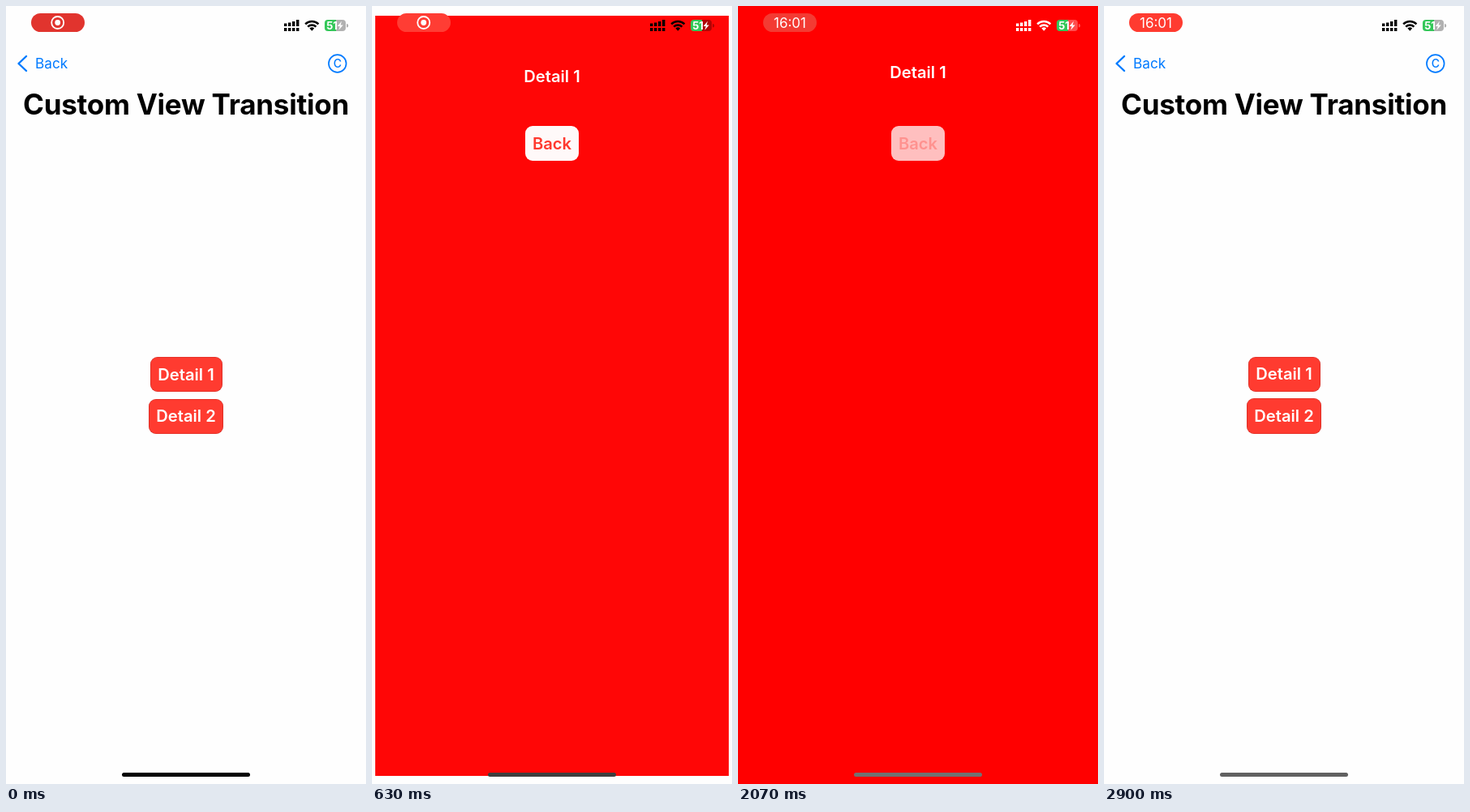
An HTML page for the animation above (2.93 s loop, 444 by 960 pixels).

```html
<!DOCTYPE html>
<html lang="en">
<head>
<meta charset="utf-8">
<title>Custom View Transition</title>
<style>
  html, body { margin: 0; width: 100%; height: 100%; overflow: hidden; background: #fefefe; }
  #stage {
    position: absolute; left: 0; top: 0; width: 444px; height: 960px; overflow: hidden;
    background: #fefefe; font: 600 20.2px/1 Inter, "Open Sans", sans-serif;
  }
  #stage div { position: absolute; }
  svg { position: absolute; left: 0; top: 0; overflow: visible; }
  .label { transform: translate(-50%, -50%); white-space: nowrap; color: #fff; left: 222px; }
  .tile { background: #ff3b30; border-radius: 9px; overflow: hidden; }
  .tile { box-shadow: inset 0 0 0 .6px rgba(110, 0, 0, .35); }
  .edge { box-shadow: inset 0 0 0 .8px rgba(110, 0, 0, .6); }
  #first { left: 177.5px; width: 89.5px; height: 43px; }
  #firstLabel { left: 44.5px; }
  #detail { background: #f00; }
  #pill { left: 189px; top: 148px; width: 66px; height: 43px; border-radius: 9px; background: #fff; }
  #back { left: 33px; top: 21.5px; color: #ff3b30; }
  #nav { left: 0; top: 0; width: 444px; height: 150px; }
  #heading { top: 120.5px; color: #000; font-size: 35px; font-weight: 700; letter-spacing: -.007em; }
  #navBack { left: 36px; top: 62.4px; color: #007aff; font-size: 17.2px; font-weight: 400; }
  #mark { left: 408.8px; top: 71px; color: #007aff; font-size: 14px; font-weight: 500; }
  #capsule { left: 31px; top: 9px; width: 66px; height: 23px; border-radius: 11.5px; }
  #clock { left: 33px; top: 11.7px; font-size: 17px; font-weight: 400; }
  #charge { left: 402px; top: 24.3px; font-size: 13px; font-weight: 700; }
  #bar { left: 143px; top: 946px; width: 158px; height: 5px; border-radius: 2.5px; }
</style>
</head>
<body>
<div id="stage">
  <div id="first" class="tile"><div id="firstLabel" class="label">Detail 1</div></div>
  <div id="second" class="tile"></div>

  <div id="detail"></div>
  <div id="secondLabel" class="label">Detail 2</div>
  <div id="title" class="label">Detail 1</div>
  <div id="pill"><div id="back" class="label">Back</div></div>

  <div id="nav">
    <svg width="444" height="150" fill="none" stroke="#007aff">
      <path d="M25 62 L15.5 71 L25 80" stroke-width="2.4" stroke-linecap="round" stroke-linejoin="round"/>
      <circle cx="408.8" cy="71" r="10.8" stroke-width="1.7"/>
    </svg>
    <div id="navBack">Back</div>
    <div id="mark" class="label">C</div>
    <div id="heading" class="label">Custom View Transition</div>
  </div>

  <div id="capsule">
    <svg id="record" width="66" height="23">
      <circle cx="32.7" cy="11.5" r="7.5" fill="none" stroke="#fff" stroke-width="1.8"/>
      <circle cx="32.7" cy="11.5" r="3.4" fill="#fff"/>
    </svg>
    <div id="clock" class="label">16:01</div>
  </div>

  <svg id="status" width="444" height="40">
    <g fill="currentColor">
      <path d="M343 27h3.4v4H343z M348 27h3.4v4H348z M353 27h3.4v4H353z M358 27h3.4v4H358z"/>
      <path d="M343 21.5h3.4V25H343z M348 20.5h3.4V25H348z M353 19h3.4v6H353z M358 17h3.4v8H358z"/>
      <path d="M377.3 30.8 L374.4 27.6 A4.2 4.2 0 0 1 380.2 27.6 Z"/>
    </g>
    <g fill="none" stroke="currentColor" stroke-width="2.5">
      <path d="M369.2 22.4 A11.5 11.5 0 0 1 385.4 22.4 M372.2 25.7 A7.2 7.2 0 0 1 382.4 25.7"/>
    </g>
    <g fill="currentColor" opacity=".3">
      <path d="M407 17h8a4 4 0 0 1 4 4v6a4 4 0 0 1-4 4h-8z M420 22a2.3 2.3 0 0 1 0 4.6z"/>
    </g>
    <path d="M407 17h-10a4 4 0 0 0-4 4v6a4 4 0 0 0 4 4h10z" fill="#34c759"/>
    <path d="M414 18.8l-5.3 6.2h3.1l-1.4 4.8 5.4-6.4h-3.2z" fill="#fff"/>
  </svg>
  <div id="charge" class="label">51</div>
  <div id="bar"></div>
</div>

<script>
  const LOOP = 2930, OPEN = 139, CLOSE = 2160.5;
  const el = {};
  document.querySelectorAll('#stage [id]').forEach(e => el[e.id] = e);

  const mix = (a, b, k) => a + (b - a) * k;
  const ramp = (t, a, b) => Math.min(1, Math.max(0, (t - a) / (b - a)));
  const smooth = k => k * k * (3 - 2 * k);
  // Critically damped spring from 0 to 1
  const spring = (ms, w) => {
    const x = Math.max(0, ms) / 1000 * w;
    return 1 - (1 + x) * Math.exp(-x);
  };
  // Linear track through [time, value...] points
  const track = (t, pts) => {
    let i = 0;
    while (i < pts.length - 2 && t >= pts[i + 1][0]) i++;
    const [a, b] = [pts[i], pts[i + 1]], k = ramp(t, a[0], b[0]);
    return a.slice(1).map((v, n) => Math.round(mix(v, b[n + 1], k)));
  };
  const rgb = c => `rgb(${c.join()})`;
  const press = (t, down, up, out) => ramp(t, down, down + 70) * (1 - ramp(t, up, out));

  const place = (e, cx, cy, w, h) => {
    e.style.left = cx - w / 2 + 'px';
    e.style.top = cy - h / 2 + 'px';
    e.style.width = w + 'px';
    e.style.height = h + 'px';
  };
  const setText = (e, s) => { if (e.textContent !== s) e.textContent = s; };

  const capsuleTrack = [[0, 225, 52, 46], [270, 238, 56, 48], [630, 255, 61, 52],
    [1000, 240, 62, 55], [1370, 228, 64, 57], [1800, 238, 62, 54],
    [2230, 246, 58, 49], [2530, 255, 59, 48], [2930, 255, 59, 48]];
  const barTrack = [[0, 0], [560, 0], [630, 62], [800, 122], [2000, 122], [2230, 96], [2930, 96]];

  function draw(t) {
    const closing = t >= CLOSE;
    const p = closing ? 1 - spring(t - CLOSE, 12.4) : spring(t - OPEN, 11.42);
    const q = 1 - p;
    const shift = t >= OPEN && !closing ? 75 : 0;
    const tap = press(t, 30, 130, 250);
    const tapBack = press(t, 1700, 2240, 2420);
    // Tiles return a little later than they leave
    const tiles = closing ? ramp(q, .2, 1) : q;

    // List screen
    el.first.style.top = 433 + shift + 'px';
    el.first.style.opacity = tiles * (1 - .25 * tap);
    el.firstLabel.style.top = 21.5 - (410 + shift) * p + 'px';
    el.firstLabel.style.opacity = 1 - .6 * tap;
    setText(el.firstLabel, p > .02 ? 'Deta…' : 'Detail 1');
    el.secondLabel.style.top = 506 + shift + 'px';
    el.secondLabel.style.opacity = closing ? q : q * q;

    // Shared background growing out of the second tile
    const box = [222, mix(506, 480, p), mix(92, 444, p), mix(43, 960, p)];
    place(el.second, ...box);
    place(el.detail, ...box);
    el.second.style.opacity = tiles;
    el.detail.style.opacity = p;
    el.detail.className = p < .95 ? 'edge' : '';

    // Detail screen
    el.title.style.top = 81.5 + (closing ? 373 : 246) * q + 'px';
    el.title.style.opacity = closing ? Math.max(0, 1 - 4 * q) : p;
    el.pill.style.top = 148 - (closing ? 10.6 * q : 0) + 'px';
    el.pill.style.opacity = p * (1 - .25 * tapBack);
    el.back.style.opacity = 1 - .7 * tapBack;

    // Navigation bar
    const hidden = smooth(ramp(t, 127, 327)) - smooth(ramp(t, 2131, 2331));
    el.nav.style.transform = `translateY(${-150 * hidden}px)`;

    // System chrome
    const light = Math.round(255 * (ramp(t, 640, 900) - ramp(t, 2260, 2480)));
    el.status.style.color = rgb([light, light, light]);
    el.capsule.style.background = rgb(track(t, capsuleTrack));
    el.record.style.display = t < 1500 ? '' : 'none';
    el.clock.style.display = t < 1500 ? 'none' : '';
    const [g] = track(t, barTrack);
    el.bar.style.background = rgb([g, g, g]);
  }

  const start = performance.now();
  function tick() {
    draw((performance.now() - start) % LOOP);
    requestAnimationFrame(tick);
  }
  tick();
</script>
</body>
</html>
```
